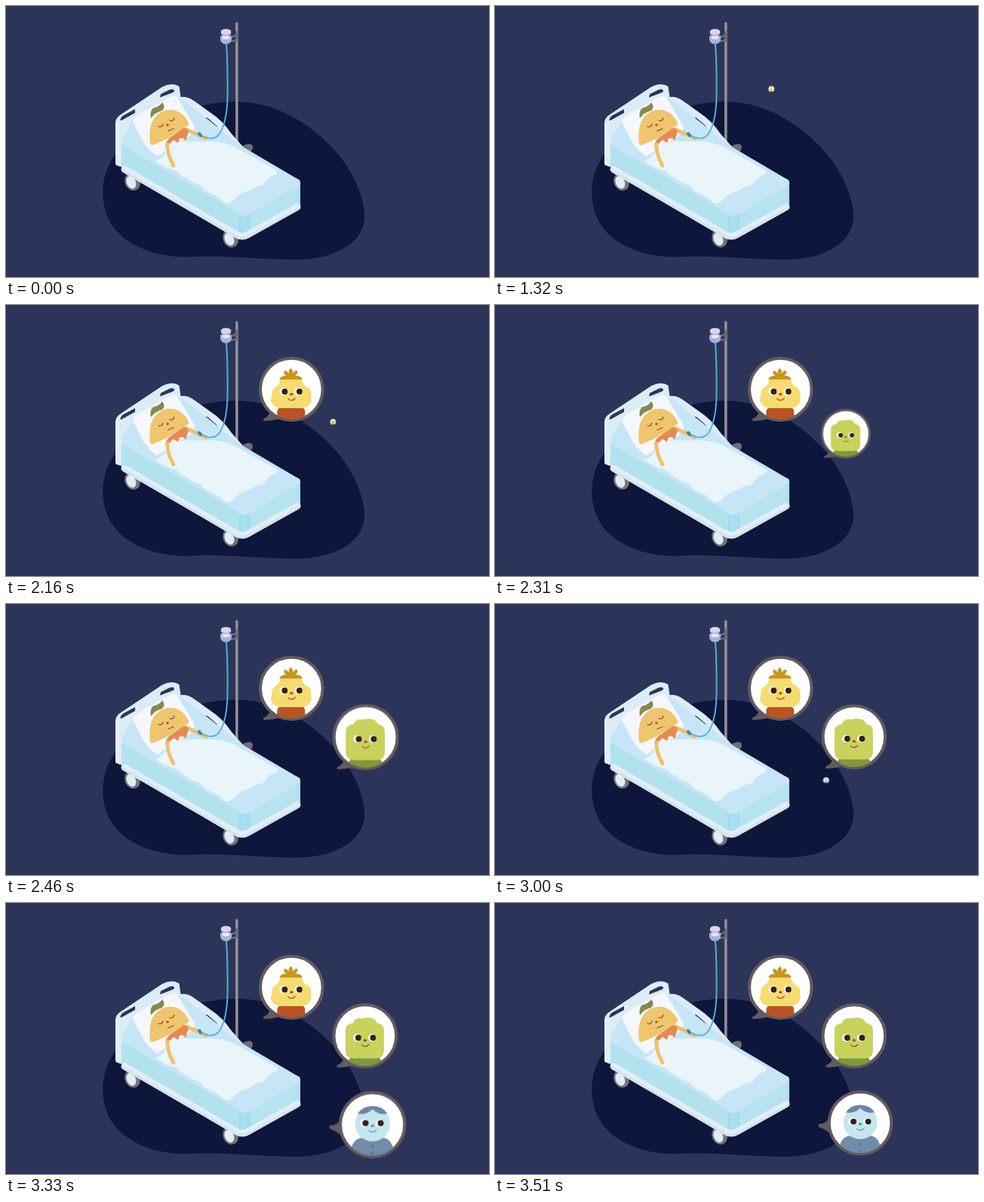
An HTML page without scripts that plays this animation: 640x360 px, repeating every 6.54 s.

```html
<!DOCTYPE html>
<html lang="en">
<head>
<meta charset="utf-8">
<title>Hospital bed with thought bubbles</title>
<style>
  html, body { margin: 0; width: 100%; height: 100%; overflow: hidden; background: #2c3559; }
  svg { display: block; width: 100vw; height: 100vh; }
  .line { fill: none; stroke-linecap: round; stroke-linejoin: round; }

  .bubble { animation: 6.54s linear infinite; }
  .one   { transform-origin: 365px 110px; animation-name: pop1; }
  .two   { transform-origin: 429px 153px; animation-name: pop2; }
  .three { transform-origin: 434px 228px; animation-name: pop3; }

  /* grow past full size, then settle */
  @keyframes pop1 {
    0%, 20.17% { opacity: 0; }
    20.18%, 100% { opacity: 1; }
    0% { transform: scale(0); }
    19.72% { transform: scale(0); animation-timing-function: cubic-bezier(.27, .26, .3, 1); }
    26.15% { transform: scale(1.044); animation-timing-function: ease-in-out; }
    27.98%, 100% { transform: scale(1); }
  }
  @keyframes pop2 {
    0%, 33.01% { opacity: 0; }
    33.02%, 100% { opacity: 1; }
    0% { transform: scale(0); }
    32.57% { transform: scale(0); animation-timing-function: cubic-bezier(.27, .26, .3, 1); }
    38.99% { transform: scale(1.044); animation-timing-function: ease-in-out; }
    40.83%, 100% { transform: scale(1); }
  }
  @keyframes pop3 {
    0%, 45.86% { opacity: 0; }
    45.87%, 100% { opacity: 1; }
    0% { transform: scale(0); }
    45.41% { transform: scale(0); animation-timing-function: cubic-bezier(.27, .26, .3, 1); }
    51.83% { transform: scale(1.044); animation-timing-function: ease-in-out; }
    53.67%, 100% { transform: scale(1); }
  }
</style>
</head>
<body>
<svg viewBox="0 0 640 360">
  <defs>
    <clipPath id="disc"><circle r="40"/></clipPath>
    <circle id="ring" r="41.3" fill="#fff" stroke="#625b5f" stroke-width="4"/>
    <path id="tail" d="M-28 24Q-27 35 -37 39Q-39 42 -35 42Q-24 42 -13 38Z" fill="#625b5f"/>
    <g id="face">
      <circle cx="-10.8" r="5" fill="#fff"/>
      <circle cx="9.2" r="5" fill="#fff"/>
      <circle cx="-9" r="3.9" fill="#33201f"/>
      <circle cx="10.5" r="3.9" fill="#33201f"/>
      <ellipse cy="3.5" rx="2.2" ry="1.7" fill="currentColor"/>
      <path class="line" d="M-4.5 9.5Q0 14 5 9" stroke="currentColor" stroke-width="1.2"/>
    </g>
    <g id="wheel" transform="rotate(-24)">
      <ellipse rx="10" ry="12" fill="#787376"/>
      <ellipse cx="-1.8" rx="6" ry="8.8" fill="#dfedf6"/>
    </g>
  </defs>

  <rect width="640" height="360" fill="#2c3559"/>
  <path d="M305 127C365 127 415 165 445 203C466 232 476 262 475 283C472 318 430 337 385 337C340 337 290 331 250 333C205 336 157 321 138 287C125 263 125 232 138 208C160 165 240 127 305 127Z" fill="#0e163c"/>

  <!-- drip stand -->
  <path d="M310 187L320 183.500Q326 182 327 187Q327 193 321 196L312 194Z" fill="#716d73"/>
  <path class="line" d="M298 42L306 38M298 47L306 45" stroke="#777586" stroke-width="2"/>
  <path class="line" d="M305.800 23V188" stroke="#918f9a" stroke-width="3.600"/>
  <path d="M304 33h3.600v14h-3.600Z" fill="#6d6a77"/>
  <path d="M284 40Q291 35 299 40V45Q298 50 291.500 51Q285 50 284 45Z" fill="#a9b1de"/>
  <ellipse cx="291.500" cy="42" rx="5" ry="2.200" fill="#e9e8f7"/>
  <ellipse cx="291.500" cy="36" rx="6.800" ry="3.500" fill="#c3bfe2"/>
  <ellipse cx="291.500" cy="34" rx="6.800" ry="3.600" fill="#ddd3eb"/>

  <!-- bed -->
  <use href="#wheel" x="0" y="0" transform="translate(167.500 233.500)"/>
  <use href="#wheel" transform="translate(297.500 309)"/>
  <path d="M145 156Q145 149 151 145L207 107.500Q221 101 229.500 107L231.500 121Q241 120 249 126L270 141Q287 152 299 170L314 187L300 200L180 205L155 214Q145 213 145 206Z" fill="#dcecf5"/>
  <path d="M151.500 152Q151.500 147 157 144.500L171 137V142L153 152ZM204 121.500L205 117L217 111Q223 109 223 113.500L221 115Z" fill="#2c3559"/>
  <path d="M263.500 150Q264 147 268 149.500L279 159Q282 163 281 166L266 154Z" fill="#16204a"/>
  <path d="M154 176L168 152L222 120Q234 123 244 132L312 186L390 232L312 280L154 188Z" fill="#c6e6f8"/>
  <path d="M153 184L312 277V308L153 216Z" fill="#b2e2ee"/>
  <path d="M323 275L390 235V266L316 308L310 304Z" fill="#b5e4f0"/>
  <path d="M310 278Q316 279 323 275V304L310 305Z" fill="#a6dff0"/>
  <path d="M308 277Q316 281 324 276L390 236.500Q391 232 385 229L330 250Z" fill="#c6e6f8"/>
  <path class="line" d="M310 279V300M323 277V298M389 238V260" stroke="#99cbdd" stroke-width=".8"/>
  <path class="line" d="M157 217L306 304Q313 308 320 304L386 267" stroke="#d3e4ee" stroke-width="9"/>
  <path class="line" d="M157 215L306 302Q313 306 320 302L386 265.500" stroke="#e2eef6" stroke-width="5"/>
  <path class="line" d="M148 157V209" stroke="#e3eff7" stroke-width="6"/>

  <!-- bedding -->
  <path d="M168 154Q170 147 178 143L219 120Q226 118 229 125L249 158Q253 167 238 176L200 200Q188 191 182 181Z" fill="#f5f7fd"/>
  <path d="M198 206Q207 203 211 195L216 184L236 180L262 180Q284 178 303 187L360 219Q362 223 352 226Q345 231 341 238Q331 239 323 245Q309 249 301 258Q296 264 289 261Q282 253 272 249Q262 246 258 238Q247 235 240 229Q232 226 226 219Q210 215 198 206Z" fill="#e9f5f8"/>

  <!-- patient -->
  <path class="line" d="M239 164Q250 169 265 176" stroke="#efc06a" stroke-width="5"/>
  <path d="M211 186Q212 177 220 173L235 162Q241 162 242 167L238 179Q235 174 230 176L228 182L222 178L217 183Z" fill="#e58b50"/>
  <path class="line" d="M214 184Q213 196 222 212" stroke="#efc06a" stroke-width="4.8"/>
  <path d="M191 183Q188 159 198 147Q208 136 222 138Q235 141 242 155Q243 158 239 160L214 176Q200 183 193 185Z" fill="#efc56d"/>
  <path d="M192 149Q190 140 195 135.500Q203 134 207 128Q212 134 207 139Q198 141 192 149Z" fill="#85894f"/>
  <g class="line" stroke="#6f5a32" stroke-width="1.3">
    <path d="M202 160Q206 162 208 157M217 152Q221 154 223 149M215 166L222 163"/>
  </g>
  <circle cx="214" cy="158" r="1.8" fill="#c5552c"/>
  <path class="line" d="M292 50Q294 80 293.500 120Q293 152 284 168Q276 182 257 171" stroke="#56b3da" stroke-width="1.9"/>
  <path class="line" d="M256 169.500L258 172" stroke="#2c8da5" stroke-width="4"/>

  <!-- thought bubbles -->
  <g class="bubble one"><g transform="translate(378.300 112)">
    <use href="#tail"/><use href="#ring"/>
    <g clip-path="url(#disc)">
      <path d="M-19 45V30Q-19 24 -12 24H11Q18 24 18 30V45Z" fill="#bb5425"/>
      <path d="M-15 -15H14Q14 -5 21 -3Q27 0 26 9Q28 16 23 21Q19 25 12 25H-13Q-21 25 -25 20Q-29 15 -26 9Q-27 0 -21 -3Q-15 -6 -15 -15Z" fill="#f5dc70"/>
      <path d="M-16 -13Q-15 -18 -7 -18Q-12 -21 -9 -25Q-5 -24 -3 -20Q-5 -25 -1 -28Q3 -25 1 -20Q4 -25 7 -25Q10 -22 5 -18Q14 -18 14 -13Z" fill="#c9951f"/>
      <use href="#face" y="3" color="#b94f24"/>
    </g>
  </g></g>

  <g class="bubble two"><g transform="translate(475.800 176.500)">
    <use href="#tail"/><use href="#ring"/>
    <g clip-path="url(#disc)">
      <path d="M-26 45Q-23 26 -12 26H12Q22 26 25 45Z" fill="#7f983b"/>
      <path d="M-16 -17Q-13 -25 -4 -23Q12 -27 16 -17Q25 -16 25 -7V19Q25 30 14 30H-15Q-26 30 -26 19V-7Q-26 -16 -16 -17Z" fill="#c8d25c"/>
      <use href="#face" y="2.500" color="#9b5a28"/>
    </g>
  </g></g>

  <g class="bubble three"><g transform="translate(484 292.300)">
    <path d="M-41 -8Q-44 1 -54 1Q-57 3 -54 6Q-46 8 -39 15Z" fill="#625b5f"/>
    <use href="#ring"/>
    <g clip-path="url(#disc)">
      <path d="M-29 45Q-29 17 -12 17H12Q28 17 28 45Z" fill="#718baa"/>
      <circle cy="-1" r="22.500" fill="#c4e6ef"/>
      <path d="M-19 -14Q-13 -24 0 -24Q13 -24 19 -14Q7 -12 0 -20Q-7 -12 -19 -14Z" fill="#6d84a6"/>
      <use href="#face" y="-2" color="#5f8fac"/>
      <path class="line" d="M0 28h.1M0 37h.1" stroke="#4e6787" stroke-width="2.600"/>
    </g>
  </g></g>
</svg>
</body>
</html>
```
